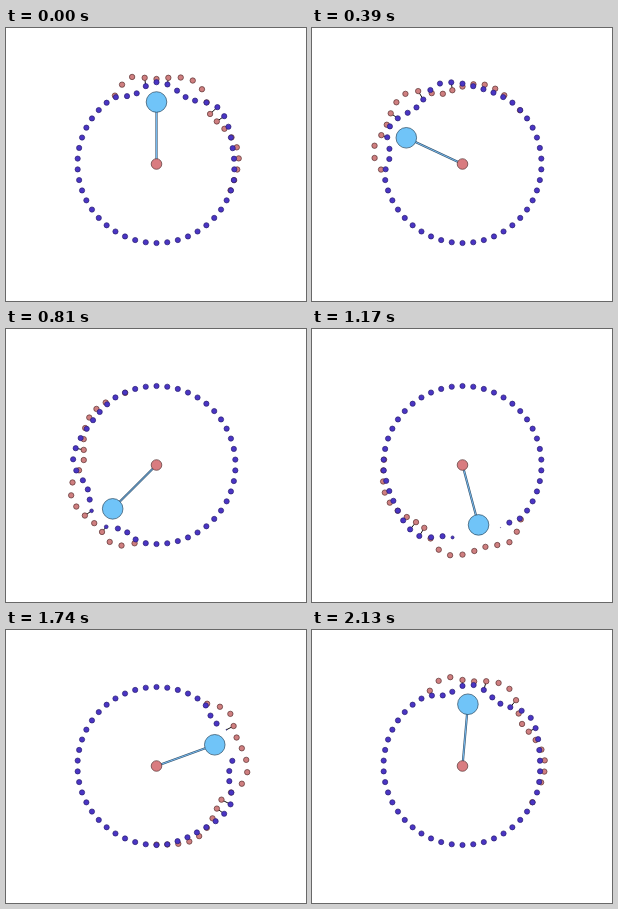
An HTML page with a canvas for the animation above (2160 ms loop, 300 px wide and 273 px high).

```html
<!DOCTYPE html>
<html>
<head>
<meta charset="utf-8">
<style>
html, body { margin: 0; width: 100%; height: 100%; overflow: hidden; background: #fff; }
canvas { display: block; }
</style>
</head>
<body>
<canvas id="stage" width="300" height="273"></canvas>
<script>
const ctx = document.getElementById('stage').getContext('2d');
const LOOP = 2160, STEP = 30, DOTS = 46, SPACING = 360 / DOTS, REST = 79;
const CX = 150.5, CY = 136;

// Wave radii, one per dot spacing, starting five spacings ahead of the ball.
const BLUE = [79, 78.2, 74, 73.4, 78.6, 81.8, 80.3, 76.2, 73, 74.2,
  79.2, 83.3, 82.9, 81, 79, 77.8, 77.7, 78, 79];
const RED = [79, 80, 86.5, 90.4, 87, 85, 87, 89.8, 91, 87.5,
  79.5, 73.3, 73.8, 76.5, 79.6, 82, 82.4, 80.9, 79.3, 78.6, 79];

// Catmull-Rom through the wave profile; at rest outside it.
function radius(wave, behind) {
  const u = behind / SPACING + 5, i = Math.floor(u), f = u - i;
  const [a, b, c, d] = [-1, 0, 1, 2].map(k => wave[i + k] ?? REST);
  return b + f / 2 * (c - a + f * (2 * a - 5 * b + 4 * c - d + f * (3 * (b - c) + d - a)));
}

function polar(deg, r) {
  const t = deg * Math.PI / 180;
  return [CX - r * Math.sin(t), CY - r * Math.cos(t)];
}

function disc([x, y], r, fill, edge) {
  ctx.beginPath();
  ctx.arc(x, y, r, 0, 2 * Math.PI);
  ctx.fillStyle = fill;
  ctx.fill();
  ctx.strokeStyle = edge;
  ctx.lineWidth = 0.7;
  ctx.stroke();
}

function line(from, to, width, colour) {
  ctx.beginPath();
  ctx.moveTo(...from);
  ctx.lineTo(...to);
  ctx.lineWidth = width;
  ctx.strokeStyle = colour;
  ctx.stroke();
}

function draw(now) {
  const turn = Math.floor(now % LOOP / STEP) * STEP / LOOP * 360;
  // Blue dots close to the ball vanish on the lower part of the turn.
  const gap = 20 * (Math.cos((turn - 220) * Math.PI / 180) + 0.2) / 1.2;

  const dots = Array.from({ length: DOTS }, (_, i) => {
    const deg = i * SPACING;
    const behind = (turn - deg + 585) % 360 - 225;
    const rb = radius(BLUE, behind), rr = radius(RED, behind);
    const size = gap > 0 ? Math.max(0, Math.min(1, (Math.abs(behind - 2) - gap) / 5 + 0.1)) : 1;
    return { blue: polar(deg, rb), red: polar(deg, rr), apart: Math.abs(rb - rr), size };
  });

  ctx.fillStyle = '#fff';
  ctx.fillRect(0, 0, 300, 273);

  for (const d of dots)
    if (d.size && d.apart > 0.5 && d.apart < 10.5) line(d.red, d.blue, 1, '#111');
  for (const d of dots)
    if (d.apart > 0.2) disc(d.red, 2.7, '#cf7f80', '#5a3030');
  for (const d of dots)
    if (d.size) disc(d.blue, 2.6 * d.size, '#4a35c4', '#2a2070');

  const hub = [CX, CY], ball = polar(turn, 62);
  line(hub, ball, 2.2, '#3d5870');
  line(hub, ball, 1, '#74b8ee');
  disc(hub, 5.3, '#d97c80', '#5a3838');
  disc(ball, 10.3, '#70c4f8', '#2c4a60');

  requestAnimationFrame(() => draw(performance.now() - start));
}

const start = performance.now();
draw(0);
</script>
</body>
</html>
```
